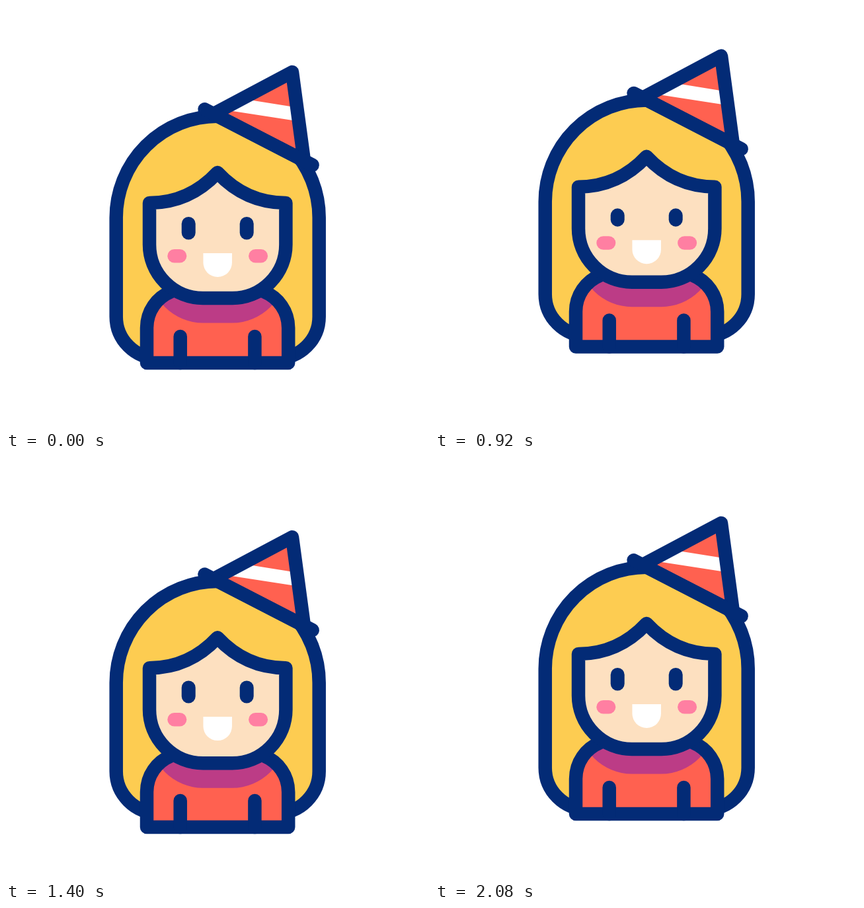
Animation of 640x640 px, one loop 2400 ms. Source, as an HTML page with a canvas:

```html
<!DOCTYPE html>
<html lang="en">
<head>
<meta charset="utf-8">
<title>Party girl</title>
<style>
  html, body { margin: 0; width: 100%; height: 100%; overflow: hidden; background: #fff; }
  canvas { display: block; width: 100%; height: 100%; }
</style>
</head>
<body>
<canvas id="stage" width="640" height="640"></canvas>
<script>
const ctx = document.getElementById('stage').getContext('2d');
const LOOP = 2400;
const STEP = 40;
const SWING = 440;
const CENTER = 320.2;
const NAVY = '#032b76', HAIR = '#fdcc51', SKIN = '#fde0c0', RED = '#ff6150',
      SHADE = '#bc3c86', PINK = '#ff7fa2', WHITE = '#fff';

function ease(t, t0, t1) {
  const u = Math.min(1, Math.max(0, (t - t0) / (t1 - t0)));
  return u * u * (3 - 2 * u);
}

// Down, up and down again, one swing apart, then back to rest.
function bounce(t, start, firstTurn, end, down, up, downAgain) {
  const secondTurn = firstTurn + SWING, thirdTurn = secondTurn + SWING;
  return down * ease(t, start, firstTurn)
    + (up - down) * ease(t, firstTurn, secondTurn)
    + (downAgain - up) * ease(t, secondTurn, thirdTurn)
    - downAgain * ease(t, thirdTurn, end);
}

function fill(path, color) {
  ctx.fillStyle = color;
  ctx.fill(path);
}

function outline(path) {
  ctx.strokeStyle = NAVY;
  ctx.stroke(path);
}

function shifted(dy, draw) {
  ctx.save();
  ctx.translate(0, dy);
  draw();
  ctx.restore();
}

// Rounded box centred on x.
function box(x, top, width, height, radii) {
  const path = new Path2D();
  path.roundRect(x - width / 2, top, width, height, radii);
  return path;
}

function pair(gap, top, width, height, color) {
  for (const side of [-1, 1]) {
    fill(box(CENTER + side * gap, top, width, height, Math.min(width, height) / 2), color);
  }
}

const facePath = new Path2D(
  'M217 298 C258 298 293 281 320 252 C347 281 382 298 423.4 298 ' +
  'V361 a81 81 0 0 1 -81 81 H298 a81 81 0 0 1 -81 -81 Z');
const bodyPath = new Path2D(
  'M213 540 V487 C213 462 228 441 250 432 Q285 419 320 419 ' +
  'T390 432 C412 441 427.2 462 427.2 487 V540 Z');
const armsPath = new Path2D('M263.7 500 V540 M376.4 500 V540');
const hatPath = new Path2D('M433 100 L314 163.3 L451 233.8 Z');
const stripePath = new Path2D('M360 140.7 L440 153.5 V174 L330 157 Z');
const brimPath = new Path2D('M300.5 156.3 L463.7 240.7');

function drawHair(stretch) {
  const path = box(CENTER, 166.8, 307, 366.2 + stretch, [153.5, 153.5, 63, 63]);
  fill(path, HAIR);
  outline(path);
}

function drawBody(chinShift) {
  fill(bodyPath, RED);
  ctx.save();
  ctx.clip(bodyPath);
  shifted(chinShift + 37.5, () => fill(facePath, SHADE));
  ctx.restore();
  outline(bodyPath);
  outline(armsPath);
}

function drawHat() {
  fill(hatPath, RED);
  fill(stripePath, WHITE);
  outline(hatPath);
  outline(brimPath);
}

function drawFace(lag, squint) {
  fill(facePath, SKIN);
  outline(facePath);
  shifted(lag, () => {
    pair(44, 319 + squint, 21, 34.5 - squint, NAVY);
    pair(61.4, 368, 29, 20.5, PINK);
    fill(box(CENTER, 374, 43.5, 36, [0, 0, 21.7, 21.7]), WHITE);
  });
}

function draw(t) {
  const body = bounce(t, 200, 600, 1920, 38, -38.5, 25.6);
  const head = bounce(t, 200, 640, 1900, 59.5, -60.4, 39.5);
  const stretch = bounce(t, 280, 680, 2000, -22.5, 0, -22.4);
  const lag = bounce(t, 360, 760, 2080, 12.3, -13.5, 12.6);
  const squint = Math.max(0, bounce(t, 320, 760, 2080, 11.5, -3, 5));

  ctx.fillStyle = WHITE;
  ctx.fillRect(0, 0, 640, 640);
  ctx.lineWidth = 20.5;
  ctx.lineCap = ctx.lineJoin = 'round';

  shifted(head, () => drawHair(stretch));
  shifted(body, () => drawBody(head - body));
  shifted(head, () => {
    drawHat();
    drawFace(lag, squint);
  });
}

const start = performance.now();
function tick() {
  const t = (performance.now() - start) % LOOP;
  draw(Math.floor(t / STEP) * STEP);
  requestAnimationFrame(tick);
}
tick();
</script>
</body>
</html>
```
